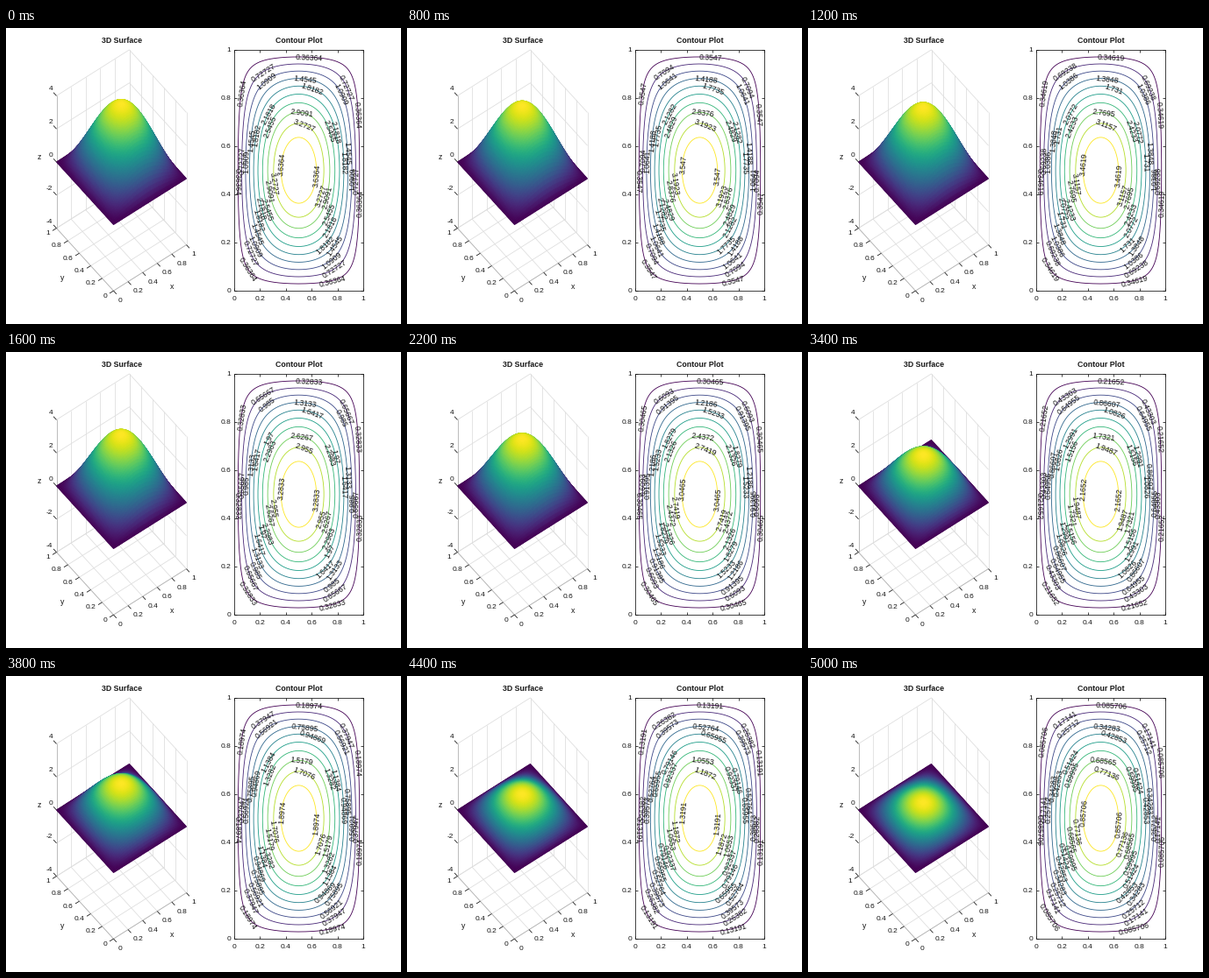
Recreate the animation shown at these times as a matplotlib script. Size 450 px wide and 338 px high, loop 5200 ms.

```python
import numpy as np
import matplotlib.pyplot as plt
from matplotlib.animation import FuncAnimation

W, H, DPI = 450, 338, 100
FRAMES, STEP = 26, 200
INK, AXIS, GRID = "#161616", "#b4b4b4", "#dedede"
plt.rcParams["font.family"] = "Liberation Sans"

fig = plt.figure(figsize=(W / DPI, H / DPI), dpi=DPI, facecolor="white")
ax = fig.add_axes([0, 0, 1, 1])
ax.set_xlim(0, W)
ax.set_ylim(H, 0)
ax.axis("off")


def pt(px):
    return px * 72 / DPI


def line(xs, ys, color=INK, width=0.8, z=3):
    ax.plot(xs, ys, color=color, lw=pt(width), zorder=z, solid_capstyle="butt")


def label(x, y, s, size=8.4, ha="center", va="center", **kw):
    return ax.text(x, y, s, fontsize=pt(size), color=INK, ha=ha, va=va,
                   zorder=6, **kw)


# Oblique projection of the 3D box
ORIGIN = np.array([122.5, 224.5])
EX, EY, EZ = np.array([83, -52.5]), np.array([-65, -71.5]), np.array([0, -18.9])


def project(x, y, z):
    return tuple(ORIGIN[i] + EX[i] * x + EY[i] * y + EZ[i] * z for i in (0, 1))


def segment(a, b, color=GRID, z=1):
    (x0, y0), (x1, y1) = project(*a), project(*b)
    line([x0, x1], [y0, y1], color=color, z=z)


def tick(x, y, dx, dy):
    line([x, x + dx], [y, y + dy])


def draw_box():
    for i in range(6):
        v = i / 5
        segment((v, 0, -4), (v, 1, -4))
        segment((v, 1, -4), (v, 1, 4))
        segment((0, v, -4), (1, v, -4))
        segment((1, v, -4), (1, v, 4))
    for z in range(-4, 5, 2):
        segment((0, 1, z), (1, 1, z))
        segment((1, 1, z), (1, 0, z))

    for end in ((1, 0, -4), (0, 1, -4)):
        segment((0, 0, -4), end, AXIS)
    segment((0, 1, -4), (0, 1, 4), AXIS)
    for i in range(6):
        s = f"{i / 5:g}"
        x, y = project(i / 5, 0, -4)
        tick(x, y, 3.4, 3.7)
        label(x + 5.5, y + 11, s, ha="left")
        x, y = project(0, i / 5, -4)
        tick(x, y, -4.5, 2.8)
        label(x - 7.5, y + 6, s, ha="right")
    for z in range(-4, 5, 2):
        x, y = project(0, 1, z)
        tick(x, y, -3.4, -3.7)
        label(x - 4.5, y - 7.5, str(z), ha="right")
    label(189, 296, "x", 8.8)
    label(64, 285, "y", 8.8)
    label(38, 147, "z", 8.8)
    label(132, 14.8, "3D Surface", 8.8, weight="bold")


# Contour panel
L, R, T, B = 260, 407, 25, 300
N = 10


def draw_panel():
    line([L, R, R, L, L], [T, T, B, B, T], z=4)
    for i in range(6):
        s = f"{i / 5:g}"
        x, y = L + (R - L) * i / 5, B + (T - B) * i / 5
        tick(x, B, 0, -3)
        tick(x, T, 0, 3)
        tick(L, y, 3, 0)
        tick(R, y, -3, 0)
        label(x, B + 9.5, s)
        label(L - 3.5, y + 0.5, s, ha="right")
    label(334, 14.8, "Contour Plot", 8.8, weight="bold")


def contour(level):
    """Curve sin(pi x) sin(pi y) = level, from the bottom to the right."""
    t = np.linspace(0, 2 * np.pi, 721)
    c, s = np.cos(t), np.sin(t)
    lo = np.zeros_like(t)
    hi = 0.5 / np.maximum(abs(c), abs(s))
    for _ in range(40):
        r = (lo + hi) / 2
        inside = np.cos(np.pi * r * c) * np.cos(np.pi * r * s) > level
        lo, hi = np.where(inside, r, lo), np.where(inside, hi, r)
    return (L + R) / 2 + (R - L) * r * s, (T + B) / 2 + (B - T) * r * c


CELL = 0.01
SPACING = 115.7


def start_offset(level):
    """Distance from the lowest point to where the curve enters its grid row."""
    y = np.ceil(np.arcsin(level) / np.pi / CELL) * CELL
    x = np.arcsin(level / np.sin(np.pi * y)) / np.pi
    return (x - 0.5) * (R - L)


def draw_contours():
    tags = []
    for k in range(1, N + 1):
        level = k / (N + 1)
        x, y = contour(level)
        line(x, y, color=plt.cm.viridis((k - 1) / (N - 1)), width=0.85, z=2)
        arc = np.append(0, np.cumsum(np.hypot(np.diff(x), np.diff(y))))
        total = arc[-1]
        count = int(np.ceil(total / SPACING))
        for i in range(count):
            p = start_offset(level) + (i + 0.5) * total / count
            near = np.array([p - 1, p, p + 1]) % total
            xs, ys = np.interp(near, arc, x), np.interp(near, arc, y)
            turn = np.degrees(np.arctan2(ys[0] - ys[2], xs[2] - xs[0]))
            turn = (turn + 90) % 180 - 90
            tag = label(xs[1], ys[1], "", 8.7, rotation=turn,
                        rotation_mode="anchor", va="center_baseline")
            tags.append((level, tag))
    return tags


draw_box()
draw_panel()
tags = draw_contours()

# Far corner first, so near patches cover those behind
g = np.linspace(1, 0, 61)
GX, GY = np.meshgrid(g, g)
SHAPE = np.sin(np.pi * GX) * np.sin(np.pi * GY)
surface = None


def update(n):
    global surface
    step = (6 * n + 3) // 5
    height = 4 * np.cos(np.sqrt(2) * np.pi * 0.01 * step)
    if surface is not None:
        surface.remove()
    px, py = project(GX, GY, height * SHAPE)
    surface = ax.pcolormesh(px, py, SHAPE, shading="gouraud", cmap="viridis",
                            vmin=0, vmax=1, zorder=2)
    ax.set_xlim(0, W)
    ax.set_ylim(H, 0)
    for level, tag in tags:
        tag.set_text(f"{height * level:.5g}")
    return []


anim = FuncAnimation(fig, update, frames=FRAMES, interval=STEP,
                     init_func=lambda: update(0), repeat=True, blit=False)
plt.show()
```
